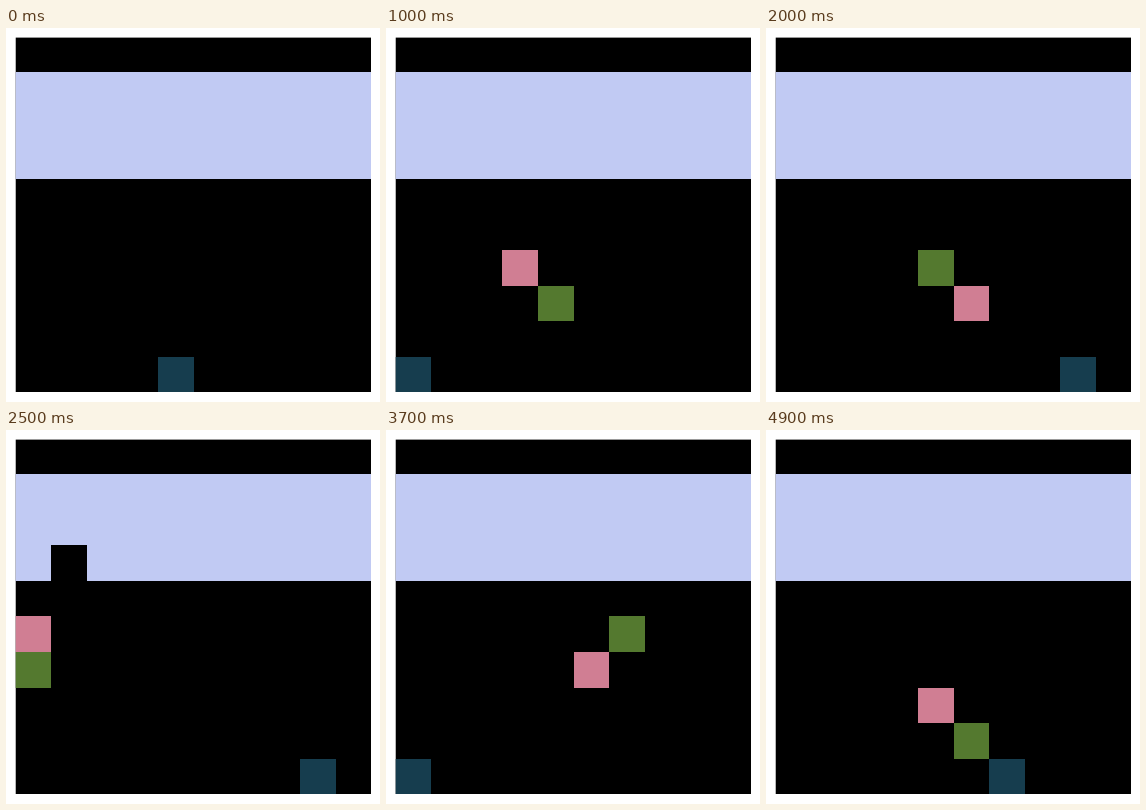
Write an HTML page that moves like this. It is 374 px wide and 374 px high and loops after 5000 ms.

```html
<!DOCTYPE html>
<html lang="en">
<head>
<meta charset="utf-8">
<title>Brick game</title>
<style>
html, body { margin: 0; width: 100%; height: 100%; overflow: hidden; background: #fff; }
svg { display: block; width: 100%; height: 100%; }
</style>
</head>
<body>
<svg id="stage" viewBox="0 0 374 374"></svg>
<script>
const STEP = 100, STEPS = 50, CELL = 35.56;
const stage = document.getElementById('stage');

// Cell edges snap to whole pixels, except the soft outer left and top edges.
const edgeX = i => i ? Math.round(9.72 + CELL * i) : 9.72;
const edgeY = i => i ? Math.round(8.64 + CELL * i) : 9.6;

function addRect(fill) {
  const rect = document.createElementNS('http://www.w3.org/2000/svg', 'rect');
  rect.setAttribute('fill', fill);
  stage.appendChild(rect);
  return rect;
}

function place(rect, cell, cols = 1, rows = 1) {
  rect.setAttribute('visibility', cell ? 'visible' : 'hidden');
  if (!cell) return;
  const [col, row] = cell;
  const x = edgeX(col), y = edgeY(row);
  rect.setAttribute('x', x);
  rect.setAttribute('y', y);
  rect.setAttribute('width', edgeX(col + cols) - x);
  rect.setAttribute('height', edgeY(row + rows) - y);
}

const board = addRect('#000');
const paddle = addRect('#163d4e');
const ball = addRect('#54792f');
const trail = addRect('#d07e93');
const bricks = addRect('#c1caf3');
const hole = addRect('#000');
place(board, [0, 0], 10, 10);
place(bricks, [0, 1], 10, 3);

// Paddle column per step, and the serving column at the start of each round.
const paddleCols = '4556654321004433456789988877444333321000111245666' + '6';
const serves = { 0: 9, 6: 0, 12: 0, 28: 9, 44: 0 };

function simulate() {
  const states = [];
  let x, y, dx, dy, gap;
  for (let i = 0; i < STEPS; i++) {
    let last;
    if (i in serves) {
      x = serves[i];
      y = 3;
      dx = x ? -1 : 1;
      dy = 1;
      gap = null;
      last = [x, y];
    } else {
      last = [x, y];
      x += dx;
      y += dy;
      if (x < 0 || x > 9) {
        x = last[0];
        dx = -dx;
      }
      if (y === 3) {
        gap = [x, y];
        y = last[1];
        dy = 1;
      } else if (y === 9) {
        // A hit with the leading corner sends the ball straight back.
        y = last[1];
        dx = -dx;
        dy = -1;
      }
    }
    states.push({ ball: [x, y], trail: last, hole: gap, paddle: [+paddleCols[i], 9] });
  }
  return states;
}

const states = simulate();

function draw(time) {
  const state = states[Math.floor(time / STEP) % STEPS];
  place(paddle, state.paddle);
  place(ball, state.ball);
  place(trail, state.trail);
  place(hole, state.hole);
}

const start = performance.now();
function tick() {
  draw(performance.now() - start);
  requestAnimationFrame(tick);
}
tick();
</script>
</body>
</html>
```
